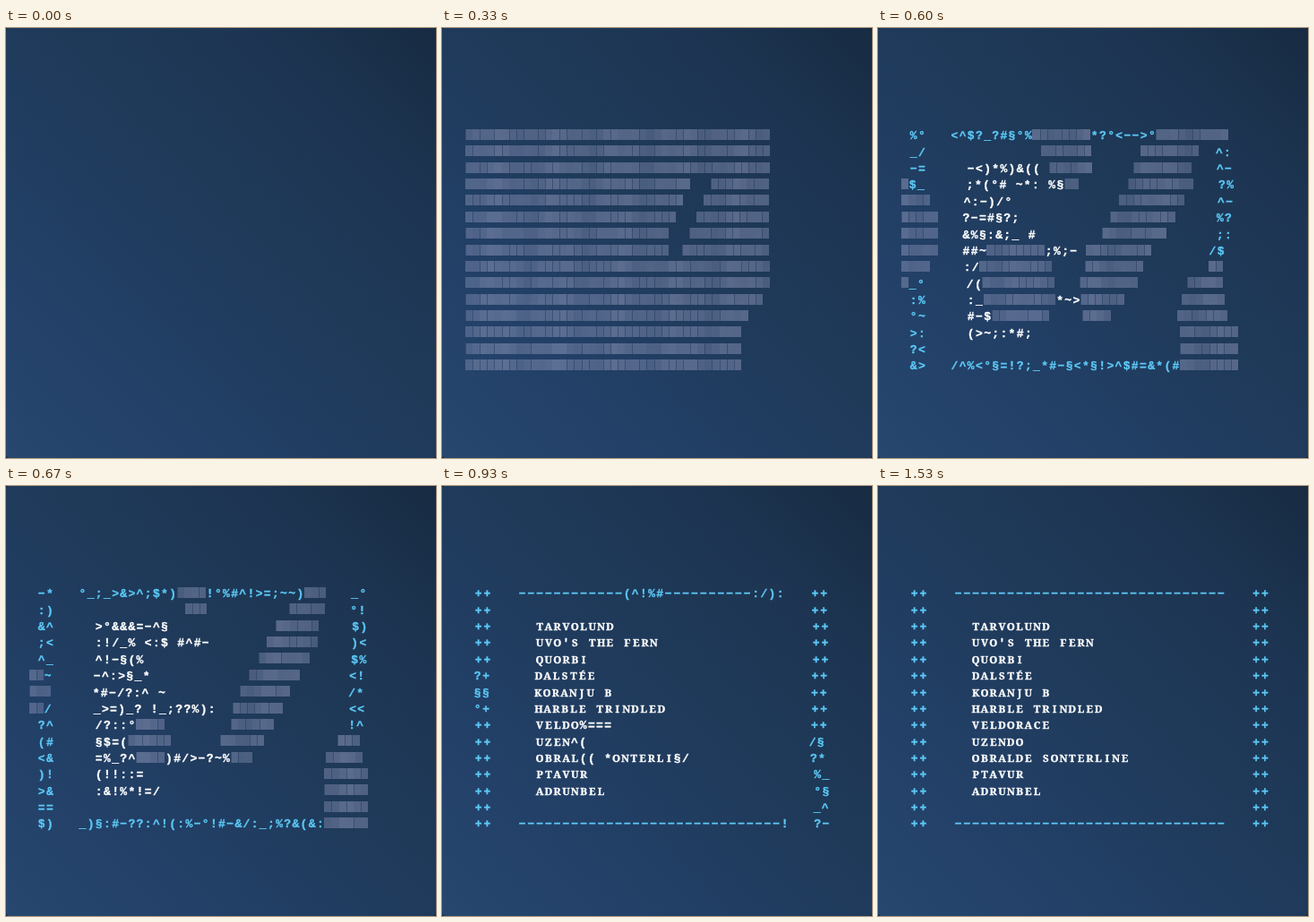
An HTML page with a canvas that plays this animation: 480 px wide and 480 px high, repeating every 1590 ms.

```html
<!DOCTYPE html>
<html lang="en">
<head>
<meta charset="utf-8">
<title>Scrambled board</title>
<style>
  html, body { margin: 0; width: 100%; height: 100%; overflow: hidden; }
  html { background: #14263a; }
  body { background: linear-gradient(45deg, #27476f, #223f66 28%, #1f3a5a 52%, #1d3552 78%, #172b42); border-radius: 4px; }
  canvas { display: block; }
</style>
</head>
<body>
<canvas id="stage" width="480" height="480"></canvas>
<script>
const ctx = document.getElementById('stage').getContext('2d');
const LOOP = 1590, STEP = 200 / 3, COLS = 42, ROWS = 15;
const LEFT = 26, TOP = 113, PITCH = 18.37;
const DECODE_DELAY = 6.4, SETTLE_DELAY = 10.5;
const FIRST_ARRIVAL = 0.3, LAST_ARRIVAL = 5.1;
const WIDTH = { empty: 7.57, block: 8.1, scramble: 9.15, settled: 9.78 };
const SYMBOLS = '/*>§?_:%°^−#=!;&<~()$';

const names = [
  'TARVOLUND', "UVO'S THE FERN", 'QUORBI', 'DALSTÉE', 'KORANJU B',
  'HARBLE TRINDLED', 'VELDORACE', 'UZENDO', 'OBRALDE SONTERLINE',
  'PTAVUR', 'ADRUNBEL'
];
const board = Array.from({ length: ROWS }, (_, row) => {
  const edge = row === 0 || row === ROWS - 1;
  const middle = edge ? '−'.repeat(31) : '  ' + (names[row - 2] || '');
  return ' ++   ' + middle.padEnd(34) + '++';
});

// Islands the wave reaches late: column, row, column radius, row radius, lag, slant
const islands = [
  [0, 6, 5.8, 3.7, 2, 0],
  [20, -0.3, 5.1, 4, 2, 0.35],
  [15, 9, 5.8, 3.5, 2, 0],
  [30.6, 5, 5.1, 7.6, 3.4, -0.9],
  [39, -0.5, 4.5, 1.2, 1.5, 0],
  [43, 13, 9.3, 5.8, 4.5, 0]
];

function arrival(col, row) {
  const lags = islands.map(([c, r, rx, ry, lag, slant]) => {
    const dx = (col + 0.5 - c - slant * (row - r)) / rx;
    const dy = (row - r) / ry;
    return lag * (1 - dx * dx - dy * dy);
  });
  return Math.min(LAST_ARRIVAL, Math.max(FIRST_ARRIVAL, 2 + Math.max(...lags)));
}

const arrivals = board.map((_, row) =>
  Array.from({ length: COLS }, (_, col) => arrival(col, row)));

function random(a, b, c) {
  const n = Math.sin(a * 12.9898 + b * 78.233 + c * 37.719) * 43758.5453;
  return n - Math.floor(n);
}

function stateOf(age) {
  if (age <= 0) return 'empty';
  if (age <= DECODE_DELAY) return 'block';
  return age <= SETTLE_DELAY ? 'scramble' : 'settled';
}

function drawBlock(x, y, col, row, tick) {
  const left = Math.round(x), right = Math.round(x + WIDTH.block);
  const shade = 0.4 + 0.04 * Math.sin(col * 0.75 + tick) + 0.03 * Math.sin(col * 1.7 + row * 0.4);
  ctx.fillStyle = `rgba(160, 165, 200, ${shade})`;
  ctx.fillRect(left, y, right - left, 12);
  if (random(col, row, tick) < 0.5) {
    ctx.fillStyle = 'rgba(31, 58, 92, .5)';
    ctx.fillRect(left, y, 1, 12);
  }
}

function drawGlyph(glyph, x, y, color) {
  ctx.fillStyle = ctx.strokeStyle = color;
  ctx.font = /[A-ZÉ]/.test(glyph)
    ? '900 11.5px "Noto Serif", serif'
    : 'bold 13px "Liberation Mono", monospace';
  ctx.fillText(glyph, x, y);
  ctx.strokeText(glyph, x, y);
}

function drawRow(row, tick) {
  const y = TOP + row * PITCH;
  let x = LEFT;
  for (let col = 0; col < COLS; col++) {
    const state = stateOf(tick - arrivals[row][col]);
    let glyph = board[row][col];
    if (state === 'block') {
      drawBlock(x, Math.round(y), col, row, tick);
    } else if (state !== 'empty' && glyph !== ' ') {
      const color = '+−'.includes(glyph) ? '#5cc8f5' : '#fff';
      if (state === 'scramble') glyph = SYMBOLS[Math.floor(random(col, row, tick) * SYMBOLS.length)];
      drawGlyph(glyph, x + WIDTH[state] / 2, y + 11.3, color);
    }
    x += WIDTH[state];
  }
}

function draw() {
  const tick = Math.floor((performance.now() % LOOP + 4) / STEP);
  ctx.clearRect(0, 0, 480, 480);
  ctx.textAlign = 'center';
  ctx.lineWidth = 0.35;
  for (let row = 0; row < ROWS; row++) drawRow(row, tick);
  requestAnimationFrame(draw);
}
draw();
</script>
</body>
</html>
```
